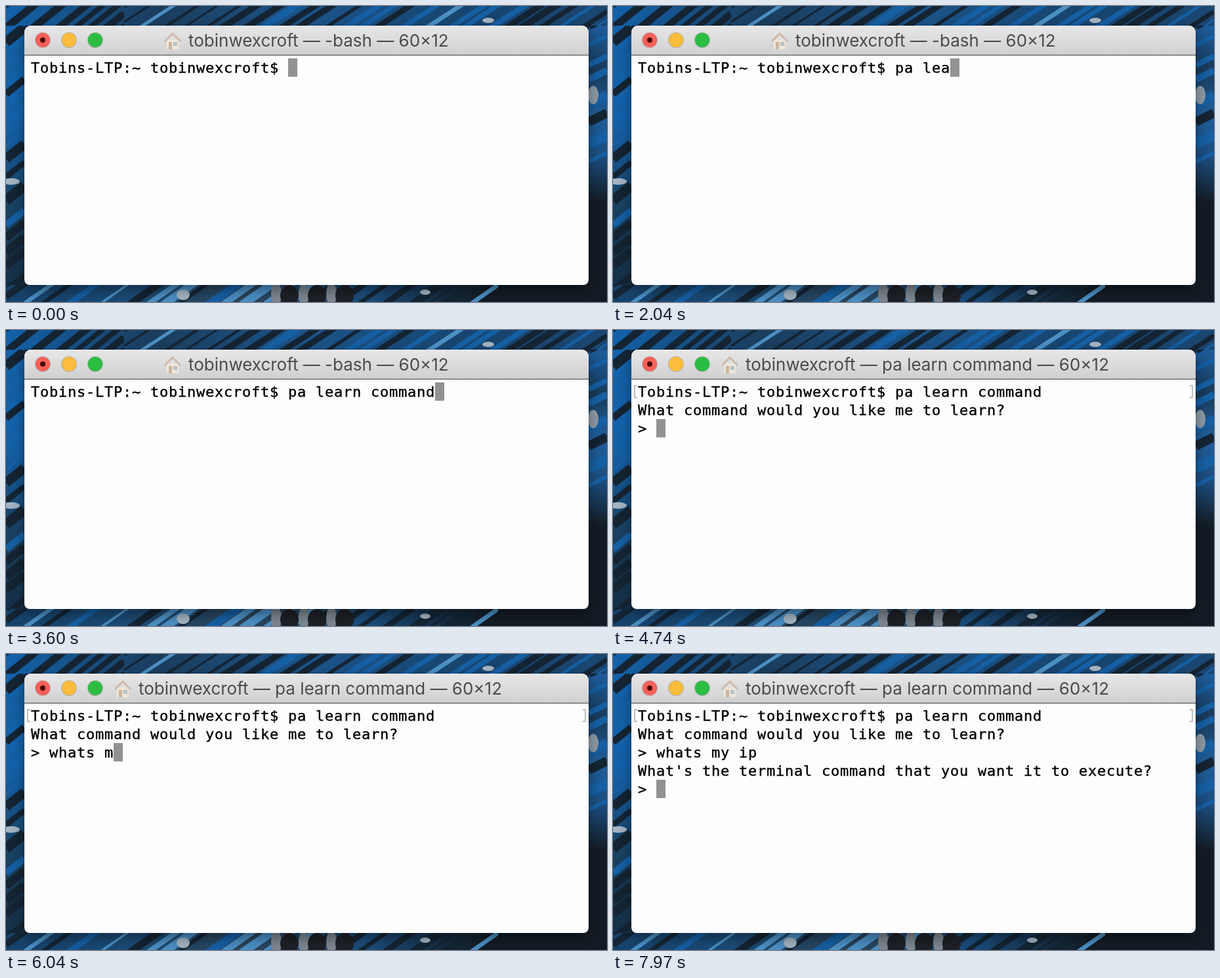
Recreate the animation shown at these times as an HTML page with a canvas. Size 916 by 452 pixels, loop 8 s.

```html
<!DOCTYPE html>
<html lang="en">
<head>
<meta charset="utf-8">
<title>Terminal</title>
<style>
html, body { margin: 0; width: 100%; height: 100%; overflow: hidden; background: #16283a; }
canvas { display: block; }
</style>
</head>
<body>
<canvas id="stage" width="916" height="452"></canvas>
<script>
const W = 916, H = 452, LOOP = 8000;
const CELL = 14, ROW = 28, LEFT = 38, TOP = 80;
const WIN = { x: 28, y: 30, w: 860, h: 396, bar: 44 };
const USER = 'tobinwexcroft';
const PROMPT = `Tobins-LTP:~ ${USER}$ `;
const ASK_TIME = 4200, EXEC_TIME = 7470;

const c = document.getElementById('stage').getContext('2d');

function seeded(seed) {
  return () => (seed = (seed * 16807) % 2147483647) / 2147483647;
}

function gradient(g, x0, y0, x1, y1, ...colors) {
  const fill = g.createLinearGradient(x0, y0, x1, y1);
  colors.forEach((color, i) => fill.addColorStop(i / (colors.length - 1), color));
  return fill;
}

function disc(g, color, x, y, rx, ry = rx) {
  g.fillStyle = color;
  g.beginPath();
  g.ellipse(x, y, rx, ry, 0, 0, 7);
  g.fill();
}

function line(g, color, width, ...points) {
  g.strokeStyle = color;
  g.lineWidth = width;
  g.beginPath();
  points.forEach(p => g.lineTo(...p));
  g.stroke();
}

function roundRect(g, color, x, y, w, h, radii) {
  g.fillStyle = color;
  g.beginPath();
  g.roundRect(x, y, w, h, radii);
  g.fill();
}

// Parallel stripes of random width, rising to the right inside one strip.
function stripes(g, x, y, w, h, slope, gap, palette, rand) {
  g.save();
  g.beginPath();
  g.rect(x, y, w, h);
  g.clip();
  const rise = w * slope;
  for (let at = y; at < y + h + rise; at += gap * (0.6 + 0.8 * rand())) {
    const color = palette[Math.floor(rand() * palette.length)];
    line(g, color, gap * (0.15 + 0.4 * rand()), [x, at], [x + w, at - rise]);
  }
  g.restore();
}

function scenery(g) {
  const rand = seeded(41);
  const navy = '#142433', blue = '#155fa3', pale = '#4b8fc4';
  g.fillStyle = navy;
  g.fillRect(0, 0, W, H);

  g.fillStyle = gradient(g, 0, 0, W, 0, '#1262ab', '#1b3d5c', '#1b548a', '#17456f', '#1a4670');
  g.fillRect(0, 0, W, WIN.y);
  stripes(g, 0, 0, 180, WIN.y, 0.8, 24, [navy], rand);
  stripes(g, 180, 0, W - 180, WIN.y, 0.65, 20, [blue, pale, navy, navy], rand);

  g.fillStyle = gradient(g, 0, WIN.y, 0, H, '#1262ab', '#1262ab', '#18405f', '#142c42');
  g.fillRect(0, WIN.y, WIN.x, H);
  stripes(g, 0, WIN.y, WIN.x, H, 0.8, 30, [navy, navy, blue], rand);

  g.fillStyle = gradient(g, 0, WIN.y, 0, 300, '#1d5c9c', '#183a58', '#205f9d', '#1b4c7c', '#131b24');
  g.fillRect(WIN.x + WIN.w, WIN.y, WIN.x, H);
  stripes(g, WIN.x + WIN.w, WIN.y, WIN.x, 210, 0.5, 30, [navy, blue], rand);

  g.fillStyle = gradient(g, 0, 0, W, 0, '#15426b', '#1b4b76', '#2a4256', '#1a4d7d', '#131b24', '#131b24');
  g.fillRect(0, WIN.y + WIN.h, W, WIN.x);
  stripes(g, 0, WIN.y + WIN.h, 750, WIN.x, 0.7, 24, [navy, navy, blue, pale], rand);
  for (let i = 0; i < 3; i++) {
    disc(g, '#7d8790', 412 + i * 42, 440, 8, 18);
    disc(g, '#1d2026', 432 + i * 42, 442, 14, 16);
  }
  const lamp = '#a3b4c2';
  disc(g, lamp, 8, 268, 13, 5);
  disc(g, lamp, 735, 22, 9, 4);
  disc(g, lamp, 270, 441, 10, 8);
  disc(g, lamp, 639, 437, 8, 4);
  disc(g, '#8d9aa5', 895, 136, 8, 14);
}

function makeBackdrop() {
  const layer = document.createElement('canvas');
  layer.width = W;
  layer.height = H;
  const g = layer.getContext('2d');
  const { x, y, w, h, bar } = WIN;
  scenery(g);

  g.save();
  g.shadowColor = 'rgba(0,0,0,.4)';
  g.shadowBlur = 20;
  g.shadowOffsetY = 8;
  roundRect(g, '#fdfdfe', x, y, w, h, [10, 10, 8, 8]);
  g.restore();
  roundRect(g, gradient(g, 0, y, 0, y + bar, '#e8e7e8', '#d1d0d1'), x, y, w, bar, [10, 10, 0, 0]);
  g.fillStyle = '#8b8b8c';
  g.fillRect(x, y + bar, w, 2);

  ['#fb6058', '#fdbc3c', '#2bbd42'].forEach((color, i) => {
    disc(g, 'rgba(0,0,0,.2)', 56 + 40 * i, 52, 12);
    disc(g, color, 56 + 40 * i, 52, 11);
  });
  disc(g, '#4b0b08', 56, 52, 4);
  return layer;
}

function house(x) {
  c.fillStyle = '#ece5da';
  c.fillRect(x + 4, 51, 18, 15);
  c.fillStyle = '#cbb59d';
  c.fillRect(x + 7, 55, 5, 11);
  c.fillStyle = '#b8c2c6';
  c.fillRect(x + 14, 55, 6, 6);
  line(c, '#cdb9ac', 3, [x + 1, 54], [x + 13, 42], [x + 25, 54]);
}

function titleBar(asked) {
  const x = asked ? 202 : 278;
  house(x - 37);
  c.font = '26px Inter, Roboto, sans-serif';
  c.letterSpacing = '0px';
  c.fillStyle = '#4c4b4c';
  c.fillText(`${USER} — ${asked ? 'pa learn command' : '-bash'} — 60×12`, x, 62);
}

function bracket(x, dir) {
  const lip = x + 4 * dir;
  line(c, '#aaaaab', 1.5, [lip, 85], [x, 85], [x, 103], [lip, 103]);
}

function typed(text, start, step, t) {
  return t < start ? '' : text.slice(0, Math.floor((t - start) / step) + 1);
}

function screenLines(t) {
  const lines = [PROMPT + typed('pa learn command', 1250, 150, t)];
  if (t >= ASK_TIME) {
    lines.push('What command would you like me to learn?',
      '> ' + typed('whats', 4850, 140, t) + typed(' my ip', 5640, 240, t));
  }
  if (t >= EXEC_TIME) lines.push("What's the terminal command that you want it to execute?", '> ');
  return lines;
}

function terminal(lines) {
  const last = lines.length - 1;
  c.fillStyle = '#929293';
  c.fillRect(LEFT + lines[last].length * CELL, TOP + last * ROW, CELL, ROW);

  c.font = '22px "DejaVu Sans Mono", monospace';
  c.letterSpacing = '0px';
  c.letterSpacing = `${CELL - c.measureText('m').width}px`;
  c.fillStyle = c.strokeStyle = '#000';
  c.lineWidth = 0.4;
  lines.forEach((text, i) => {
    c.fillText(text, LEFT, TOP + 22 + i * ROW);
    c.strokeText(text, LEFT, TOP + 22 + i * ROW);
  });
}

const backdrop = makeBackdrop();

function draw(now) {
  const t = now % LOOP;
  const asked = t >= ASK_TIME;
  c.drawImage(backdrop, 0, 0);
  titleBar(asked);
  if (asked) {
    bracket(33, 1);
    bracket(883, -1);
  }
  terminal(screenLines(t));
}

const begin = performance.now();
function tick() {
  draw(performance.now() - begin);
  requestAnimationFrame(tick);
}
tick();
</script>
</body>
</html>
```
